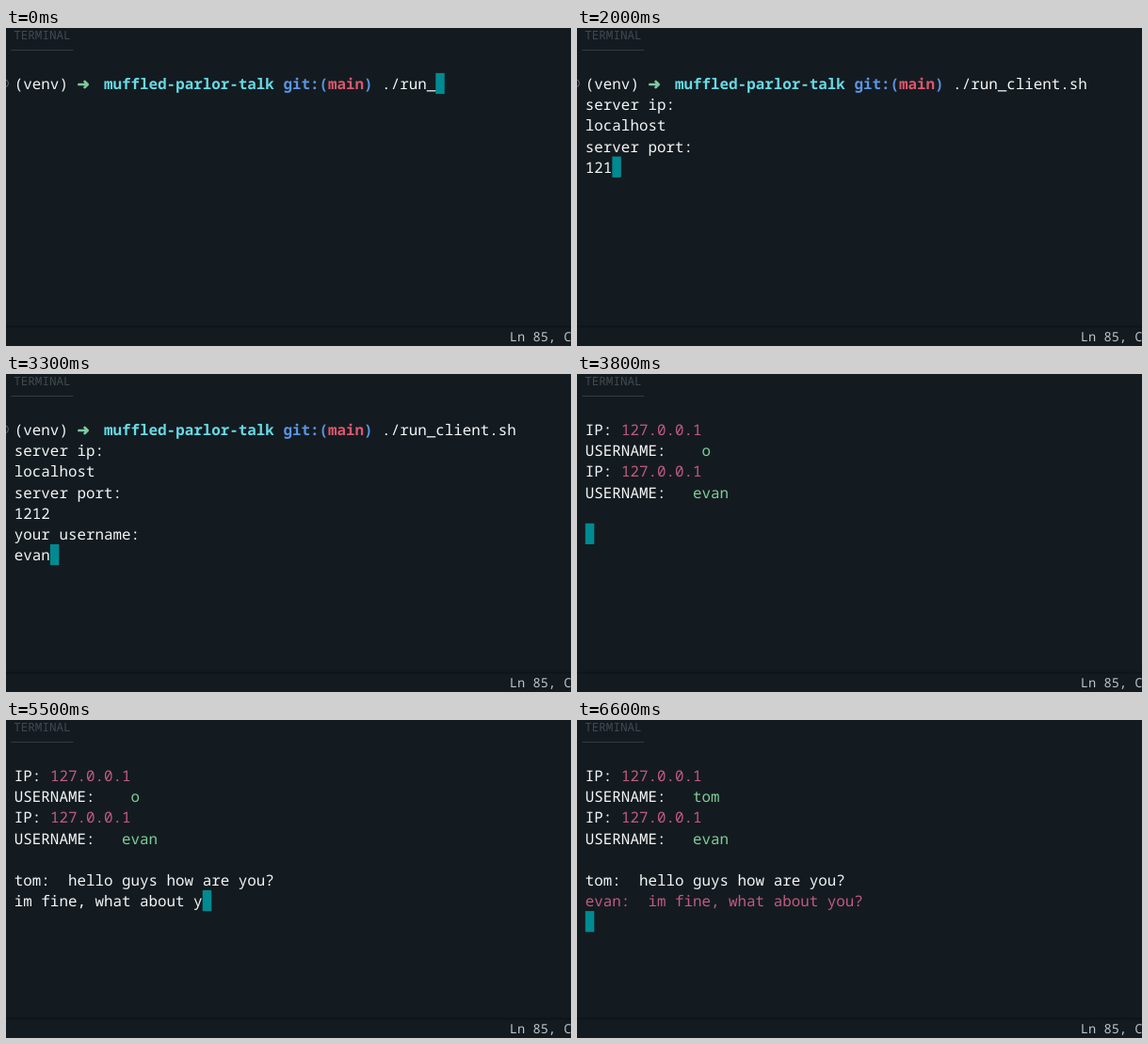
An HTML page that plays this animation: 600 px wide and 338 px high, repeating every 6.7 s.

```html
<!DOCTYPE html>
<html lang="en">
<head>
<meta charset="utf-8">
<title>Terminal chat</title>
<style>
  html, body { margin: 0; width: 100%; height: 100%; overflow: hidden; background: #141b20; }
  svg { display: block; width: 600px; height: 338px; }
  text {
    font-family: "Noto Sans Mono", monospace;
    font-size: 15.87px;
    fill: #f4f6f6;
    white-space: pre;
    text-rendering: geometricPrecision;
  }
  .tab { font-size: 12.6px; fill: #404a51; }
  .status { font-size: 13.7px; fill: #bcc3c7; }
  .arrow { font: bold 16px "DejaVu Sans", sans-serif; fill: #80cba0; stroke: #80cba0; stroke-width: .7px; }
  .dir { font-weight: bold; fill: #67dae5; }
  .git { font-weight: bold; fill: #5b94e3; }
  .branch { font-weight: bold; fill: #d9586e; }
  .pink { fill: #c15b80; }
  .green { fill: #7dce98; }
</style>
</head>
<body>
<svg viewBox="0 0 600 338">
  <rect width="600" height="338" fill="#141b20"/>
  <text class="tab" x="8.2" y="12">TERMINAL</text>
  <rect x="5.5" y="23" width="66" height="1" fill="#303c41"/>
  <rect y="316.5" width="600" height="2" fill="#0e1418"/>
  <text class="status" x="534.8" y="332.7">Ln 85, Col 1</text>
  <circle id="mark" cx="-1.5" cy="58.8" r="4" fill="none" stroke="#626b72"/>
  <rect id="cursor" width="9.5" height="22.2" fill="#008a92"/>
  <g id="screen"></g>
</svg>
<script>
const STEP = 100, STEPS = 67;
const CHAR = 9.52, LINE = 22.17, LEFT = 8.8, TOP = 47.9;
const CLEAR = 35, SENT = 64;

// row, column, text, class, first step, end step
const lines = [
  [0, 0, "(venv)", "", 0, CLEAR],
  [0, 7, "➜", "arrow", 0, CLEAR],
  [0, 10, "muffled-parlor-talk", "dir", 0, CLEAR],
  [0, 30, "git:(", "git", 0, CLEAR],
  [0, 35, "main", "branch", 0, CLEAR],
  [0, 39, ")", "git", 0, CLEAR],
  [1, 0, "server ip:", "", 9, CLEAR],
  [3, 0, "server port:", "", 17, CLEAR],
  [5, 0, "your username:", "", 22, CLEAR],
  [0, 0, "IP:", "", CLEAR, STEPS],
  [0, 4, "127.0.0.1", "pink", CLEAR, STEPS],
  [1, 0, "USERNAME:", "", CLEAR, STEPS],
  [1, 13, "o", "green", CLEAR, SENT],
  [1, 12, "tom", "green", SENT, STEPS],
  [2, 0, "IP:", "", CLEAR, STEPS],
  [2, 4, "127.0.0.1", "pink", CLEAR, STEPS],
  [3, 0, "USERNAME:", "", CLEAR, STEPS],
  [3, 12, "evan", "green", CLEAR, STEPS],
  [5, 0, "tom:  hello guys how are you?", "", 43, STEPS],
  [6, 0, "evan:  im fine, what about you?", "pink", SENT, STEPS]
];

// row, column, text, characters at start, first step, last key, end step
const inputs = [
  [0, 41, "./run_client.sh", 6, 0, 6, CLEAR],
  [1, 0, "", 0, 7, 8, CLEAR],
  [2, 0, "", 0, 9, 10, CLEAR],
  [2, 0, "localhost", 0, 11, 17, CLEAR],
  [4, 0, "1212", 0, 17, 21, CLEAR],
  [6, 0, "", 0, 22, 23, CLEAR],
  [6, 0, "evan", 0, 29, 33, CLEAR],
  [5, 0, "", 0, CLEAR, 36, 43],
  [6, 0, "im fine, what about you?", 0, 43, 57, SENT],
  [7, 0, "", 0, SENT, 65, STEPS]
];

const byId = id => document.getElementById(id);
const screen = byId("screen"), cursor = byId("cursor"), mark = byId("mark");
const colX = col => LEFT + col * CHAR;
const rowY = row => TOP + row * LINE;
const show = (el, on) => el.setAttribute("visibility", on ? "visible" : "hidden");

function addText(row, col, text, cls) {
  const el = document.createElementNS("http://www.w3.org/2000/svg", "text");
  el.setAttribute("x", colX(col));
  el.setAttribute("y", rowY(row) + 17.2);
  el.setAttribute("class", cls);
  el.textContent = text;
  return screen.appendChild(el);
}

const lineEls = lines.map(([row, col, text, cls]) => addText(row, col, text, cls));
const inputEls = inputs.map(([row, col]) => addText(row, col, "", ""));

function draw(step) {
  lines.forEach(([, , , , from, to], i) => show(lineEls[i], step >= from && step < to));
  inputs.forEach(([row, col, text, start, from, last, to], i) => {
    const active = step >= from && step < to;
    show(inputEls[i], active);
    if (!active) return;
    const part = Math.min(1, (step - from) / (last - from));
    const count = Math.round(start + (text.length - start) * part);
    inputEls[i].textContent = text.slice(0, count);
    cursor.setAttribute("x", colX(col + count));
    cursor.setAttribute("y", rowY(row));
  });
  show(mark, step < CLEAR);
}

let shown = -1;
const origin = performance.now();
function tick() {
  const step = Math.floor((performance.now() - origin) / STEP) % STEPS;
  if (step !== shown) draw(shown = step);
  requestAnimationFrame(tick);
}
tick();
</script>
</body>
</html>
```
